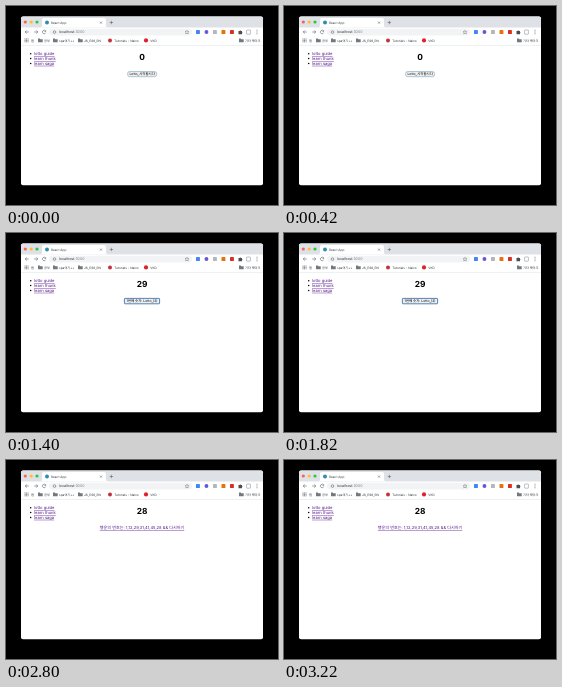
An HTML page for the animation above (3500 ms loop, 272x199 px).

```html
<!DOCTYPE html>
<html lang="ko">
<head>
<meta charset="utf-8">
<style>
  html, body { margin: 0; width: 100%; height: 100%; overflow: hidden; background: #000; }
  svg { display: block; width: 100vw; height: 100vh; text-rendering: geometricPrecision; }
  text { font-family: Inter, "Noto Sans CJK KR", "Noto Sans CJK", sans-serif; font-size: 4.1px; fill: #000; white-space: pre; }
  .ui text { font-size: 3.15px; fill: #303336; }
  .title { font-size: 8.4px; font-weight: 700; }
  .mid { text-anchor: middle; }
  .link { fill: #551a8b; text-decoration: underline .4px; text-underline-offset: .5px; }
  .label { font-size: 3.4px; text-anchor: middle; }
  .line { fill: none; stroke: #5f6368; stroke-width: .6; }
</style>
</head>
<body>
<svg viewBox="0 0 272 199">
  <rect x="15" y="10.5" width="242" height="168.8" rx="2" fill="#fff"/>
  <g class="ui">
    <path d="M15 21.5V12.5q0-2 2-2H255q2 0 2 2V21.5z" fill="#dee1e6"/>
    <path d="M34 21.5q2 0 2-2V14q0-2 2-2H98q2 0 2 2V19.5q0 2 2 2z" fill="#fff"/>
    <circle cx="19.3" cy="16" r="1.6" fill="#ff5f57"/>
    <circle cx="25.2" cy="16" r="1.6" fill="#febc2e"/>
    <circle cx="31" cy="16" r="1.6" fill="#28c840"/>
    <circle cx="41" cy="16.6" r="2" fill="#2a8fae"/>
    <text x="45" y="17.8">React App</text>
    <path class="line" d="M94 15.6l2 2m0-2l-2 2M103.7 16.5h3.4m-1.7-1.7v3.4"/>

    <path class="line" d="M22.8 26h-3.6m1.6-1.6L19.2 26l1.6 1.6"/>
    <path class="line" d="M28.2 26h3.6m-1.6-1.6l1.6 1.6-1.6 1.6"/>
    <path class="line" d="M39.6 25.2a1.7 1.7 0 1 0 .1 1.4m0-2.4v1.2h-1.3"/>
    <rect x="43" y="22.8" width="143" height="6.6" rx="3.3" fill="#f1f3f4"/>
    <circle class="line" cx="48.5" cy="26.1" r="1.3"/>
    <text x="53" y="27.4" style="font-size:3.6px">localhost<tspan id="path" fill="#74797e"></tspan></text>
    <path class="line" d="M181 24.2l.6 1.3 1.4.1-1.1 1 .4 1.4-1.3-.8-1.3.8.4-1.4-1.1-1 1.4-.1z" style="stroke-width:.4"/>
    <g id="extensions"></g>
    <path d="M232.5 25h1.1q.6-1.6 1.2 0h1.2v1.2q1.4.4 0 1.1V28.2h-3.5z" fill="#4a4d51"/>
    <rect class="line" x="240.6" y="24" width="3.8" height="4.2" rx=".4" style="stroke-width:.4"/>
    <path d="M251 24.2v.01m0 1.8v.01m0 1.8v.01" stroke="#5f6368" stroke-width=".9" stroke-linecap="round"/>

    <path d="M18.6 33h4m-4 1.4h4m-4 1.4h4" stroke="#5f6368" stroke-width=".9" stroke-dasharray=".9 .6"/>
    <text x="25" y="35.6">앱</text>
    <g id="folders"></g>
    <circle cx="104" cy="34.4" r="2" fill="#c5303a"/>
    <text x="108.3" y="35.6">Tutorials - Nalvo</text>
    <circle cx="140" cy="34.4" r="2.1" fill="#e0202b"/>
    <text x="144.3" y="35.6">VKD</text>
    <path d="M15 39.4H257" stroke="#dadce0" stroke-width=".5"/>
  </g>
  <g id="page"></g>
</svg>
<script>
const el = id => document.getElementById(id);
const text = (x, y, cls, str) => `<text x="${x}" y="${y}" class="${cls}">${str}</text>`;
const heading = str => text(136, 53.5, "title mid", str);

const button = (x, y, w, h, str, radius = 1, stroke = "#767676", width = .4) =>
  `<rect x="${x}" y="${y}" width="${w}" height="${h}" rx="${radius}" fill="#efefef"
    stroke="${stroke}" stroke-width="${width}"/>` +
  text(x + w / 2, y + h / 2 + 1.2, "label", str);

const startButton = button(121.6, 65.5, 29, 5.2, "Lotto_시작합시다", 2, "#8fb3c9", .7);
const drawButton = n => button(118.4, 65.4, 35.2, 5.4, `${n}번째 숫자: Lotto_(2)`, .6, "#3f78b5", .9);

const menu = ["lotto guide", "learn thunk", "learn saga"].map((str, i) => {
  const y = 49.2 + i * 4.8;
  return `<circle cx="24.7" cy="${y - 1.4}" r=".75"/>` + text(28, y, "link", str);
}).join("");

const guide = button(17, 41.2, 12.5, 5, "홈으로") +
  text(17, 61, "title", "lotto guide") +
  text(17, 72.2, "", "클릭시 4.321초후 번호 추첨됨");

const spinner = `<g fill="none" stroke-width="1.2">
  <circle cx="136" cy="51.5" r="5.8" stroke="#d6e4ea"/>
  <circle cx="136" cy="51.5" r="5.8" stroke="#2b86bd" pathLength="100"
    stroke-dasharray="80 20" transform="rotate(-90 136 51.5)"/></g>
  <text x="136" y="52.5" class="mid" style="font-size:2.8px;fill:#4a9cc8">80%</text>`;

const result = text(136, 69, "link mid", "행운의 번호는: 1,12,29,31,41,45,28 &amp;&amp; 다시하기");

const scenes = [
  menu + heading(0) + startButton,
  guide + heading(0) + startButton,
  menu + heading(29) + drawButton(1),
  menu + spinner + drawButton("#"),
  menu + heading(28) + result
];

el("extensions").innerHTML = ["#4285f4", "#6657d8", "#b4b7ba", "#e8710a", "#d93025"].map((color, i) =>
  `<rect x="${190 + i * 8.5}" y="24.1" width="3.9" height="3.9" rx="${i === 1 ? 1.9 : .6}" fill="${color}"/>`).join("");

el("folders").innerHTML = [[32, "공부"], [47, "spa여기++"], [72, "JS_ES6_RN"], [233, "기타 북마크"]].map(([x, str]) =>
  `<path d="M${x} 32.6h1.8l.5.6h2.4v3h-4.7z" fill="#74787d"/>` +
  text(x + 6, 35.6, "", str)).join("");

let shown = -1;
function draw(now) {
  const scene = Math.floor(now % 3500 / 700);
  if (scene !== shown) {
    shown = scene;
    el("page").innerHTML = scenes[scene];
    el("path").textContent = scene === 1 ? ":3000/1" : ":3000";
  }
  requestAnimationFrame(draw);
}
draw(0);
</script>
</body>
</html>
```
